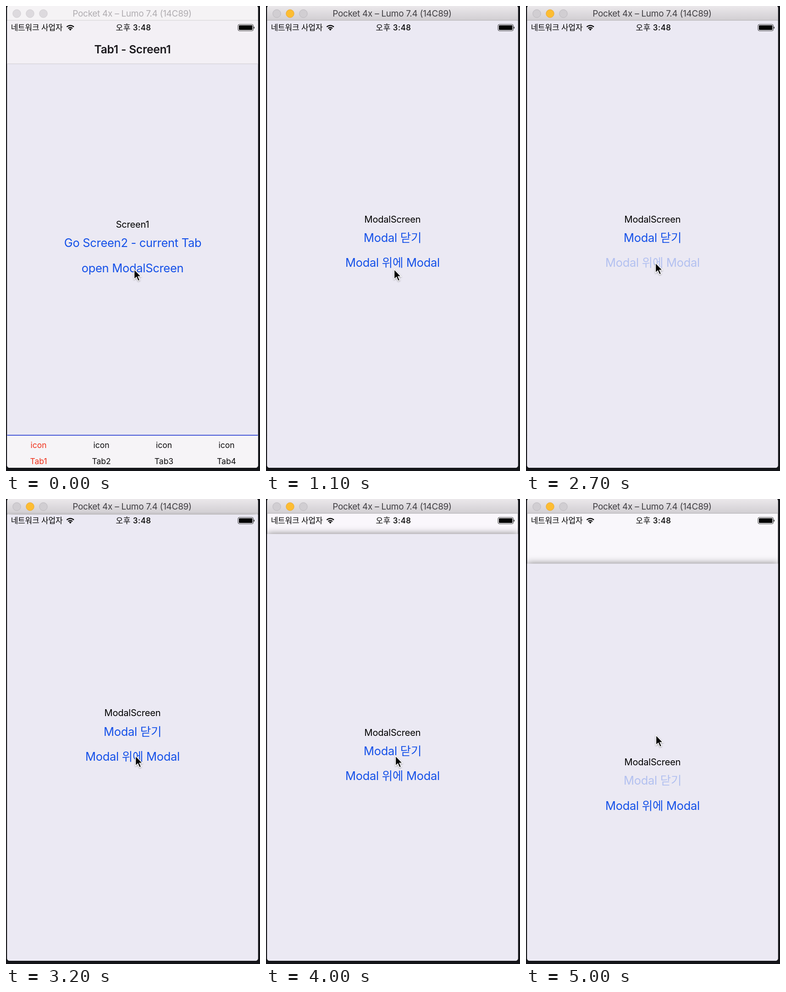
An HTML page for the animation above (5.1 s loop, 554 px wide and 1011 px high).

```html
<!DOCTYPE html>
<html lang="ko">
<head>
<meta charset="utf-8">
<title>Modal stack</title>
<style>
html, body { margin: 0; width: 100%; height: 100%; overflow: hidden; background: #141519; }
svg { display: block; width: 100vw; height: 100vh; }
text { font: 25.5px Inter, "Noto Sans CJK KR", "Noto Sans CJK", sans-serif; letter-spacing: -.3px; text-anchor: middle; }
.link { fill: #1450e8; }
.label { font-size: 20px; letter-spacing: -.2px; }
.head { font-size: 24.5px; font-weight: 600; letter-spacing: -.2px; fill: #19171b; }
.tab { font-size: 17.5px; letter-spacing: 0; }
.status { font-size: 17px; letter-spacing: -.2px; }
.clock { font-size: 17px; font-weight: 500; letter-spacing: .5px; }
.title { font-size: 19px; letter-spacing: -.3px; }
.sheet { filter: drop-shadow(0 0 8px rgba(0, 0, 0, .5)); }
#cursor { filter: drop-shadow(0 1px 1.5px rgba(0, 0, 0, .35)); }
</style>
</head>
<body>
<svg viewBox="0 0 554 1011">
  <defs>
    <linearGradient id="bar" x2="0" y2="1">
      <stop stop-color="#ebe8eb"/><stop offset="1" stop-color="#d1ced2"/>
    </linearGradient>
    <clipPath id="window"><rect x="2.5" y="-1" width="547" height="1005" rx="5"/></clipPath>
    <clipPath id="display"><rect x="2" y="32" width="548" height="972"/></clipPath>
  </defs>
  <g clip-path="url(#window)">
    <rect width="554" height="1011" fill="#fefcfe"/>
    <g clip-path="url(#display)">
      <g id="home">
        <rect x="2" y="32" width="548" height="972" fill="#ebe9f3"/>
        <rect x="2" y="32" width="548" height="94" fill="#f3f0f5"/>
        <rect x="2" y="125" width="548" height="1.3" fill="#d5d2d8"/>
        <text class="head" x="276" y="103">Tab1 - Screen1</text>
        <text class="label" x="276" y="481.5">Screen1</text>
        <text class="link" x="276.5" y="524">Go Screen2 - current Tab</text>
        <text class="link" id="open" x="276" y="578.5">open ModalScreen</text>
        <rect x="2" y="933" width="548" height="71" fill="#f6f4f7"/>
        <rect x="2" y="932.5" width="548" height="1.6" fill="#1c33d0"/>
        <g id="tabs"></g>
      </g>
      <g id="under"></g>
      <g id="top"></g>
    </g>
    <text class="status" x="67" y="53">네트워크 사업자</text>
    <text class="clock" x="278" y="53">오후 3:48</text>
    <path d="M132.5 45.5a11 11 0 0 1 15.5 0M135.6 48.7a6.6 6.6 0 0 1 9.3 0" fill="none" stroke="#000" stroke-width="2.3"/>
    <path d="M140.3 53.5l-2.8-2.8a4 4 0 0 1 5.6 0z"/>
    <rect x="506" y="40" width="33.5" height="14" rx="3" fill="none" stroke="#333"/>
    <rect x="508" y="42" width="29.5" height="10" rx="1.2"/>
    <path d="M540.5 44.5q1.5 .5 1.5 2.5t-1.5 2.5z"/>
    <rect id="chrome" x="2" width="548" height="31"/>
    <rect id="edge" x="2" y="30.5" width="548" height="1.2"/>
    <g id="lights"></g>
    <text class="title" id="title" x="275" y="23.3">Pocket 4x – Lumo 7.4 (14C89)</text>
  </g>
  <path id="cursor" d="M0 0V21.5L5 17L8.7 25.3L12.3 23.7L8.7 15.7H15.2Z" stroke="#fff" stroke-width="1.5"/>
</svg>
<script>
const LOOP = 5100, STEP = 100, HEIGHT = 972, SLIDE = 208;
const PUSHES = [872.2, 3036.3, 3888], POP = 4993.93;
const $ = id => document.getElementById(id);
const set = (el, attrs) => { for (const k in attrs) el.setAttribute(k, attrs[k]); };
const within = (t, a, b) => t >= a && t < b;
const unit = x => Math.min(1, Math.max(0, x));
const easeOut = x => 1 - (1 - unit(x)) ** 4;
const dim = pressed => pressed ? .26 : 1;

const sheet = `<rect class="sheet" x="2" y="32" width="548" height="980" fill="#ebe9f3"/>
  <text class="label" x="276" y="470.5">ModalScreen</text>
  <text class="link close" x="276" y="512.5">Modal 닫기</text>
  <text class="link more" x="276" y="567">Modal 위에 Modal</text>`;
$('under').innerHTML = $('top').innerHTML = sheet;

$('tabs').innerHTML = [71, 208, 344.5, 481].map((x, i) =>
  `<g fill="${i ? '#0b0a0c' : '#f0301a'}"><text class="tab" x="${x}" y="961">icon</text>
   <text class="tab" x="${x}" y="996">Tab${i + 1}</text></g>`).join('');
$('lights').innerHTML = [23.5, 52.5, 81.5].map(x =>
  `<circle cx="${x}" cy="16.5" r="8.7"/>`).join('');

function drawWindow(active) {
  set($('chrome'), { fill: active ? 'url(#bar)' : '#f5f3f5' });
  set($('edge'), { fill: active ? '#b4b1b5' : '#d6d3d6' });
  set($('title'), { fill: active ? '#413f43' : '#b0adb1' });
  set($('lights'), active
    ? { fill: '#d1ced2', stroke: '#bcb9be' }
    : { fill: '#dddade', stroke: '#d0cdd1' });
  set($('lights').children[1], active
    ? { fill: '#fdbd32', stroke: '#eaa834' }
    : { fill: 'inherit', stroke: 'inherit' });
}

function drawScreens(t) {
  const depth = PUSHES.filter(s => t >= s).length;
  const push = depth ? easeOut((t - PUSHES[depth - 1]) / SLIDE) : 0;
  const shown = push - easeOut((t - POP) / SLIDE);
  const fade = 1 - .82 * shown;
  const onHome = depth < 2;
  set($('home'), { opacity: fade, display: onHome ? 'inline' : 'none' });
  set($('under'), { opacity: fade, display: onHome ? 'none' : 'inline' });
  set($('top'), {
    transform: `translate(0 ${HEIGHT * (1 - shown)})`,
    display: depth ? 'inline' : 'none'
  });
  set($('open'), { opacity: dim(t >= 700) });
  set($('under').querySelector('.more'), { opacity: dim(t < 4200) });
  set($('top').querySelector('.more'), {
    opacity: dim(within(t, 2600, PUSHES[1]) || within(t, 3700, PUSHES[2]))
  });
  set($('top').querySelector('.close'), { opacity: dim(t >= 4800) });
}

function drawCursor(t) {
  const a = unit((t - 2100) / 300), b = unit((t - 4300) / 300);
  set($('cursor'), { transform: `translate(${279.5 + 3 * a + b} ${572.5 - 14 * a - 45 * b})` });
}

function frame(now) {
  const t = Math.floor(now % LOOP / STEP) * STEP;
  drawWindow(t >= 300);
  drawScreens(t);
  drawCursor(t);
  requestAnimationFrame(frame);
}
frame(0);
</script>
</body>
</html>
```
